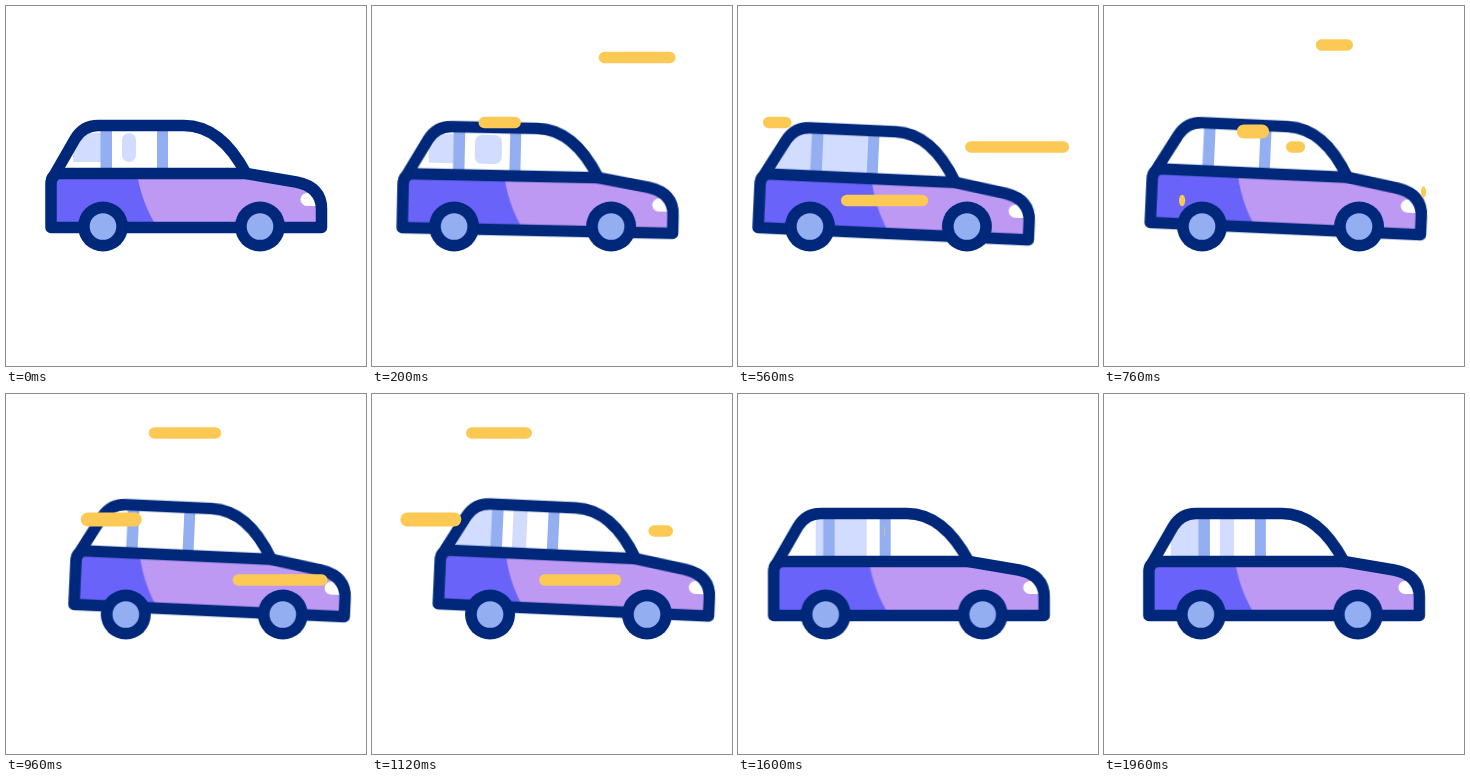
An HTML page that plays this animation: 360x360 px, repeating every 2000 ms.

```html
<!DOCTYPE html>
<html lang="en">
<head>
<meta charset="utf-8">
<title>Car</title>
<style>
html, body { margin: 0; width: 100%; height: 100%; overflow: hidden; background: #fff; }
svg { display: block; width: 100vw; height: 100vh; }

.drive, .still, .lift, .tilt { animation: 2s cubic-bezier(.37, 0, .63, 1) infinite; }
.drive { --dir: 1px; animation-name: drive; }
.still { --dir: -1px; animation-name: drive; }
.lift { animation-name: lift; }
.tilt { animation-name: tilt; transform-origin: 39px 227px; }

@keyframes drive {
  0%, 100% { transform: translateX(0); }
  21% { transform: translateX(calc(-32 * var(--dir))); }
  52% { transform: translateX(calc(25 * var(--dir))); }
  71% { transform: translateX(calc(-12 * var(--dir))); }
}
@keyframes lift {
  0%, 26%, 75%, 100% { transform: translateY(0); }
  52%, 56% { transform: translateY(-12px); }
}
@keyframes tilt {
  0%, 77%, 100% { transform: rotate(0deg); }
  21%, 61% { transform: rotate(2.6deg); }
}

/* Window reflections change in jumps */
.glass { fill: #d2dcff; }
.glass rect { y: 127px; height: 29px; animation: 2s step-end infinite; }
.glass .rear { animation-name: rear; }
.glass .mid { animation-name: mid; }
@keyframes rear {
  0%, 90%, 100% { x: 67px; width: 30px; }
  6% { x: 70px; width: 27px; }
  16%, 56% { x: 50px; width: 47px; y: 118px; height: 50px; }
  38% { x: 50px; width: 0; }
  72% { x: 87px; width: 10px; }
}
@keyframes mid {
  0%, 56%, 90%, 100% { x: 116px; width: 14px; }
  6% { x: 116px; width: 27px; }
  16% { x: 90px; width: 72px; y: 110px; height: 60px; }
  38% { x: 116px; width: 0; }
  72% { x: 105px; width: 33px; }
}

.line { fill: none; stroke: #00287a; stroke-width: 11.5; stroke-linecap: round; stroke-linejoin: round; }
.navy { fill: #00287a; }
.sky { fill: #93aff2; }
#streaks { fill: #fdc955; }
</style>
</head>
<body>
<svg viewBox="0 0 360 360">
  <defs>
    <path id="body" d="M45 221.5V178Q45 167.5 55 167.5H240L290 176Q315.500 181 315.500 203V221.500Z"/>
    <path id="cabin" d="M46 173L69 133Q77 119.500 92 119.500H178C207 119.500 226 141 240 167.500"/>
    <g id="wheel">
      <circle class="navy" cy="220.500" r="25"/>
      <circle class="sky" cy="220.500" r="13.300"/>
    </g>
    <clipPath id="inBody"><use href="#body"/></clipPath>
    <clipPath id="inCabin"><use href="#cabin"/></clipPath>
  </defs>
  <g class="drive">
    <g class="lift"><g class="tilt">
      <use href="#cabin" fill="#fff"/>
      <g clip-path="url(#inCabin)">
        <g class="glass"><rect class="rear"/><rect class="mid" rx="7"/></g>
        <path class="sky" d="M94.500 118h11.500v50h-11.500zM151 118h11v50h-11z"/>
      </g>
      <use href="#body" fill="#bd99f3"/>
      <g clip-path="url(#inBody)">
        <path class="still" fill="#6a63f9" d="M-60 160H130Q134 196 153 224H-60Z"/>
        <rect x="294.500" y="187" width="24" height="13" rx="6.500" fill="#fff"/>
      </g>
      <use href="#cabin" class="line"/>
      <use href="#body" class="line"/>
    </g></g>
    <use href="#wheel" x="97"/>
    <use href="#wheel" x="254"/>
  </g>
  <g id="streaks"></g>
</svg>
<script>
const LOOP = 2000, SIZE = 11.5;

// Two bursts of wind; lag is the time from a streak's head to its tail
const bursts = [
  { lag: 160, streaks: [
    { y: 51.5, x: 304, start: 40, speed: 0.48 },
    { y: 116.5, x: 150, start: 37, speed: 0.265, travel: 125 },
    { y: 194.5, x: 230, start: 328, speed: 0.545 },
    { y: 141, x: 337, start: 392, speed: 0.65 }
  ] },
  { lag: 210, streaks: [
    { y: 39, x: 249, start: 653, speed: 0.345 },
    { y: 125.5, x: 165, start: 650, speed: 0.29, size: 14 },
    { y: 186, x: 322, start: 750, speed: 0.452 },
    { y: 137, x: 301, start: 1070, speed: 0.481 }
  ] }
];

const group = document.getElementById("streaks");

// Head and tail run the same way at the same speed, the tail later
function addStreak({ y, x, start, speed, travel = 155, size = SIZE }, lag) {
  const rect = document.createElementNS("http://www.w3.org/2000/svg", "rect");
  rect.setAttribute("y", y - size / 2);
  rect.setAttribute("height", size);
  rect.setAttribute("rx", size / 2);
  group.append(rect);

  const run = travel / speed;
  const edge = t => x - Math.min(travel, Math.max(0, (t - start) * speed));
  const times = [0, start, start + lag, start + run, start + lag + run, LOOP];
  const frames = times.sort((a, b) => a - b).map(t => ({
    offset: t / LOOP,
    x: edge(t) + "px",
    width: edge(t - lag) - edge(t) + "px"
  }));
  rect.animate(frames, { duration: LOOP, iterations: Infinity });
}

for (const { lag, streaks } of bursts) {
  for (const streak of streaks) addStreak(streak, lag);
}
</script>
</body>
</html>
```
